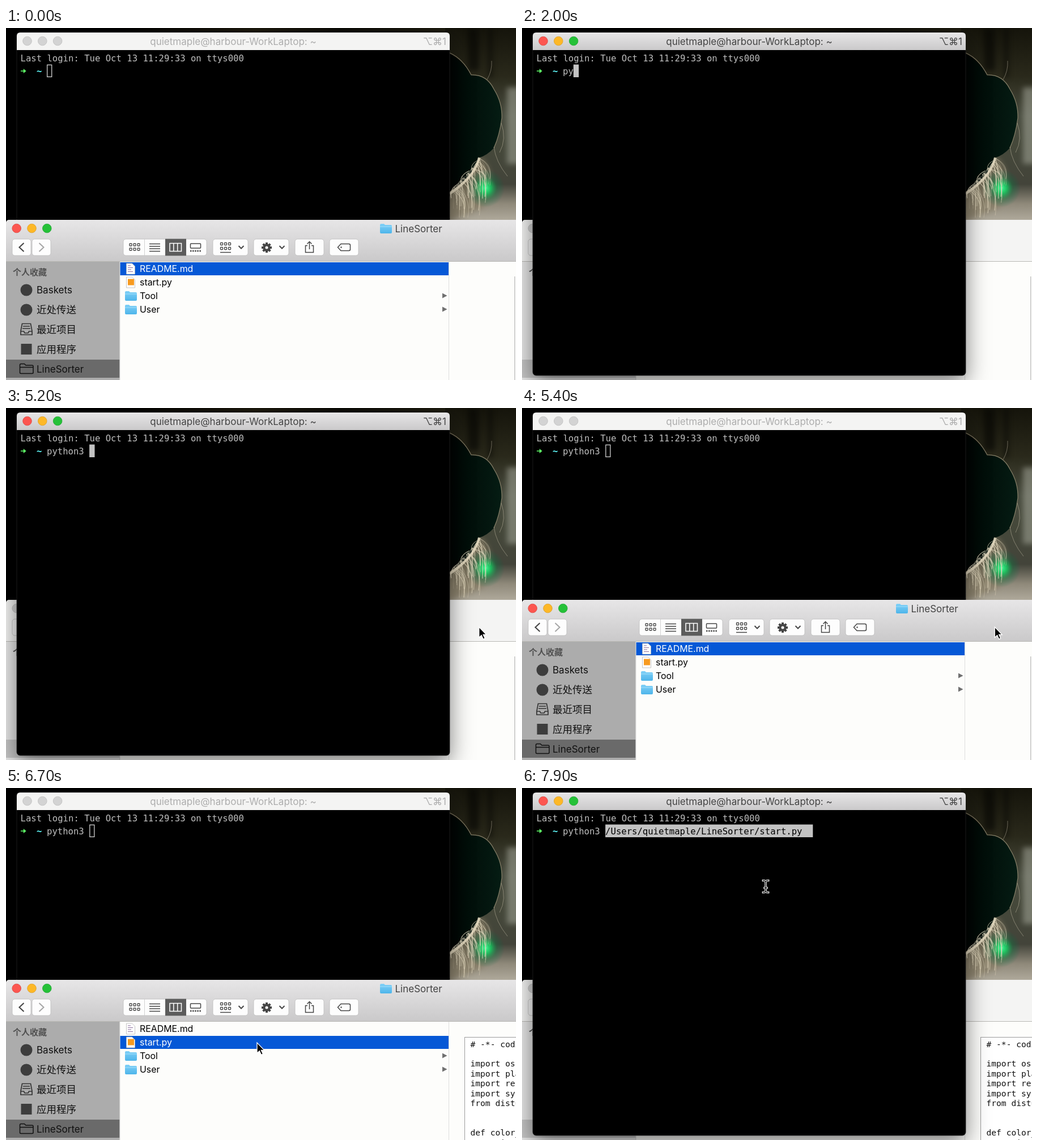
Animation of 900x622 px, one loop 8000 ms. Source, as an HTML page:

```html
<!DOCTYPE html>
<html lang="zh">
<head>
<meta charset="utf-8">
<title>Drag a script into the terminal</title>
<style>
  html, body { margin: 0; width: 100%; height: 100%; overflow: hidden; background: #000; }
  svg { display: block; width: 900px; height: 622px; }
  text { white-space: pre; dominant-baseline: alphabetic; }
  .ui { font: 17px Inter, "Noto Sans CJK SC", "Noto Sans CJK", "DejaVu Sans", sans-serif; }
  .row { font-size: 15.9px; }
  .heading { font-size: 15px; font-weight: 700; fill: #505050; }
  .mono { font: 15.6px "DejaVu Sans Mono", "Liberation Mono", monospace; fill: #bfbfbf; }
  .code { font-size: 14.6px; fill: #111; }
  .line { fill: none; stroke: #454545; stroke-width: 1.5; }
  .button { fill: #fdfdfd; stroke: #bcbcbc; stroke-width: .8; }

  .light { fill: #d3d3d3; stroke: #bdbdbd; stroke-width: .8; }
  .active .red { fill: #fc5650; stroke: #dd443e; }
  .active .yellow { fill: #fdb827; stroke: #dc9d24; }
  .active .green { fill: #25c138; stroke: #1ea630; }

  .bar { fill: #f4f4f3; }
  .active .bar { fill: url(#barFill); }
  .title { fill: #adadad; }
  .active .title { fill: #434343; }
  #terminal .shadow { filter: drop-shadow(0 14px 20px rgba(0, 0, 0, .5)); }

  .side { fill: #e8e8e8; }
  .active .side { fill: #acacac; }
  .place { fill: #c6c6c6; }
  .active .place { fill: #6a6a6a; }
  #finder:not(.active) .button { fill: #f5f5f5; }
  .file rect.pick { fill: none; }
  .file.chosen rect.pick { fill: #0558d6; }
  .file.chosen text { fill: #fff; }
  .soft { filter: blur(5px); }
</style>
</head>
<body>
<svg viewBox="0 0 900 622">
  <defs>
    <linearGradient id="barFill" x2="0" y2="1">
      <stop stop-color="#e7e6e7"/><stop offset="1" stop-color="#cac9ca"/>
    </linearGradient>
    <linearGradient id="room" x2="0" y2="1">
      <stop stop-color="#15140b"/><stop offset=".25" stop-color="#2a291b"/>
      <stop offset=".45" stop-color="#4a4d40"/><stop offset=".6" stop-color="#45483a"/>
      <stop offset=".8" stop-color="#43443a"/><stop offset=".9" stop-color="#8f897a"/>
      <stop offset="1" stop-color="#b5afa1"/>
    </linearGradient>
    <linearGradient id="topEdge">
      <stop stop-color="#000"/><stop offset=".4" stop-color="#1d190d"/>
      <stop offset=".65" stop-color="#0d0c07"/><stop offset="1" stop-color="#211f12"/>
    </linearGradient>
    <linearGradient id="hair">
      <stop stop-color="#000"/><stop offset=".4" stop-color="#010e09"/><stop offset="1" stop-color="#051c13"/>
    </linearGradient>
    <radialGradient id="glow">
      <stop stop-color="#3dff95"/><stop offset=".3" stop-color="#12c45c" stop-opacity=".85"/>
      <stop offset=".6" stop-color="#0c7440" stop-opacity=".4"/><stop offset="1" stop-color="#064" stop-opacity="0"/>
    </radialGradient>
    <linearGradient id="folderFill" x2="0" y2="1">
      <stop stop-color="#7fd0f7"/><stop offset="1" stop-color="#4eb5ea"/>
    </linearGradient>
    <path id="beamShape" d="M-4.500-10.500Q0-10.500 0-7.500V7.500Q0 10.500-4.500 10.500M4.500-10.500Q0-10.500 0-7.500M0 7.500Q0 10.500 4.500 10.500M-2 2.500H2"/>
  </defs>
  <g id="photo"></g>
  <g id="finder" class="ui"></g>
  <g id="terminal" class="ui"></g>
  <g id="arrow"><path d="M0 0V18.5L4.4 14.6 7.4 21.4 10.4 20.1 7.4 13.5H13Z"
    fill="#000" stroke="#fff" stroke-width="1.3"/></g>
  <g id="beam" fill="none" stroke-linecap="square">
    <use href="#beamShape" stroke="#fff" stroke-width="3.6"/>
    <use href="#beamShape" stroke="#000" stroke-width="1.3"/>
  </g>
</svg>
<script>
const LOOP = 8000, STEP = 100, CELL = 9.39;
const USER = "quietmaple", HOST = "harbour-WorkLaptop", FOLDER = "LineSorter";
const COMMAND = "python3 ", PATH = `/Users/${USER}/${FOLDER}/start.py`;
const $ = id => document.getElementById(id);

const rect = (x, y, w, h, attrs = "") => `<rect x="${x}" y="${y}" width="${w}" height="${h}" ${attrs}/>`;
const path = (d, attrs = 'class="line"') => `<path d="${d}" ${attrs}/>`;
const text = (x, y, s, attrs = "") => `<text x="${x}" y="${y}" ${attrs}>${s}</text>`;
const disc = (x, y, r, attrs) => `<circle cx="${x}" cy="${y}" r="${r}" ${attrs}/>`;
const lights = (x, y) => ["red", "yellow", "green"]
  .map((name, i) => disc(x + i * 26.8, y, 7.8, `class="light ${name}"`)).join("");

function seeded(seed) {
  return () => (seed = (seed * 16807) % 2147483647) / 2147483647;
}

function drawPhoto() {
  const random = seeded(77);
  const wisp = (d, width, opacity) =>
    path(d, `fill="none" stroke="#e2d8be" stroke-width="${width}" opacity="${opacity}"`);
  let strands = "";
  for (let i = 0; i < 60; i++) {
    const k = random(), x = 838 - 54 * k, y = 230 + 60 * k;
    const dx = random() * 42 - 16, dy = Math.min(20 + random() * 50, 335 - y);
    strands += wisp(`M${x} ${y}q${dx * 1.3} ${dy * .3} ${dx} ${dy}`, .6 + random() * .9, .3 + random() * .5);
  }
  return rect(200, 0, 600, 10, 'fill="url(#topEdge)"') +
    rect(775, 0, 125, 345, 'fill="url(#room)"') +
    rect(815, 0, 20, 75, 'fill="#070704" opacity=".6" class="soft"') +
    rect(850, 0, 9, 88, 'fill="#070704" opacity=".5" class="soft"') +
    rect(884, 105, 24, 135, 'fill="#9a9d90" opacity=".6" class="soft"') +
    path("M838 228Q862 250 856 300L840 318 775 345V280Z", 'fill="#857a61" opacity=".65" class="soft"') +
    path("M775 42Q806 54 821 83 848 82 861 108 876 132 875 159 871 190 861 212 848 226 835 229 828 262 775 294Z", 'fill="url(#hair)"') +
    path("M783 44Q806 54 821 83 848 82 861 108 876 132 875 159 871 190 861 212", 'fill="none" stroke="#a0957b" stroke-width="1.200" opacity=".8"') +
    wisp("M835 229Q828 262 783 293", 4, .9) +
    wisp("M849 91Q858 76 857 58M874 168Q884 196 871 220M861 210Q864 236 885 262", .8, .5) +
    disc(846, 283, 34, 'fill="url(#glow)"') + strands;
}

const folder = (x, y) =>
  path(`M${x} ${y + 2}q0-2 2-2h5l2 2h10q2 0 2 2v11q0 2-2 2H${x + 2}q-2 0-2-2Z`, 'fill="url(#folderFill)"') +
  path(`M${x} ${y + 5}h21`, 'stroke="#a5e0fb" stroke-width="1"');

const sheet = (y, mark) =>
  path(`M212.500 ${y - 9}h10l5 5v14h-15Z`, 'fill="#fff" stroke="#b8b8b8" stroke-width=".8"') + mark;

const grid = (x, y, cell, gap) => [0, 1, 2, 3, 4, 5].map(i =>
  rect(x + i % 3 * gap, y + (i > 2) * (gap + 1), cell, cell, 'class="line" rx=".8" style="stroke-width:1.300"')).join("");

function drawToolbar() {
  const buttons = [[11, 33], [46, 33], [207, 147], [365, 62], [437, 62], [510, 51], [571, 51]]
    .map(([x, w]) => rect(x, 373, w, 29, 'rx="4.500" class="button"')).join("");
  const chevrons = path("M410.500 385l4.500 4.500 4.500-4.500M482.500 385l4.500 4.500 4.500-4.500", 'class="line" style="stroke-width:2"');
  const teeth = [0, 45, 90, 135].map(a =>
    rect(458, 379, 4, 18, `fill="#454545" transform="rotate(${a} 460 388)"`)).join("");
  return buttons +
    path("M31.500 380l-8 7.500 8 7.500", 'class="line" style="stroke-width:2.100"') +
    path("M58.500 380l8 7.500-8 7.500", 'class="line" style="stroke:#a5a5a5;stroke-width:2"') +
    path("M244.500 373v29", 'stroke="#d0d0d0"') + rect(281, 372.600, 37, 29.800, 'fill="#5c5c5c"') +
    grid(218, 381, 4, 7) + path("M253 381.500h19m-19 4.300h19m-19 4.300h19m-19 4.300h19") +
    path("M289 380.500h20.500v14H289ZM295.800 381v13M302.700 381v13", 'class="line" style="stroke:#fff"') +
    rect(325.500, 381, 18, 8, 'class="line" rx="1"') + path("M325 394h19", 'class="line" stroke-dasharray="2.500 1.600" style="stroke-width:2.500"') +
    grid(378.500, 379.500, 4, 7) + path("M378 396.500h19") + chevrons +
    teeth + disc(460, 388, 6.700, 'fill="#454545"') + disc(460, 388, 2.500, 'fill="#fdfdfd"') +
    path("M532 384.500h-3.500v12h14v-12H539M535.500 391v-13.500m-4 4l4-4 4 4") +
    path("M591 381.500h14q2.500 0 2.500 2.500v7q0 2.500-2.500 2.500h-14l-5.500-6Z") + disc(591.500, 387.500, 1.200, 'fill="#454545"');
}

function drawFinder() {
  const places = [["Baskets", 463], ["近处传送", 498], ["最近项目", 533], ["应用程序", 567.500], [FOLDER, 602.500]];
  const labels = places.map(([name, y]) => text(54, y + 6, name, `fill="#111" ${/\w/.test(name) ? "" : 'style="font-size:17.500px"'}`)).join("");
  const inks = 'fill="none" stroke="#333" stroke-width="1.700"';
  const icons = [463, 498].map(y => disc(36, y, 10.500, 'fill="#3d3d3d"')).join("") +
    path("M28.500 522.500h15l2.500 13v6.500H26v-6.500ZM26 536h5.500l1.500 3h6l1.500-3H46M30 527h12m-13 4h14", inks) +
    rect(26.500, 558, 19, 19, 'fill="#3d3d3d"') +
    path("M24.500 595.500q0-2 2-2h6l2.500 2.500h11q2 0 2 2V609q0 1.500-2 1.500h-19.500q-2 0-2-1.500ZM24.500 599.500H48", 'fill="none" stroke="#111" stroke-width="1.500"');
  const docMark = path("M215 420h5m-5 3.500h9m-9 3.500h6m-6 3.500h9", 'stroke="#8a6d9c" stroke-width="1.200"');
  const files = [
    ["README.md", 425, sheet(425, docMark)],
    ["start.py", 449, sheet(449, rect(215, 443.500, 11, 11, 'fill="#f79a1f"'))],
    ["Tool", 473, folder(210, 465)],
    ["User", 497, folder(210, 489)]
  ].map(([name, y, icon], i) => `<g class="file" id="file${i}">` +
    rect(201.500, y - 11, 579.500, 23, 'class="pick"') + icon +
    text(236, y + 5.500, name, 'class="row"') +
    (i > 1 ? path(`M770 ${y - 4.500}l8.500 4.500-8.500 4.500Z`, 'fill="#707070"') : "") + "</g>").join("");
  const source = ["# -*- coding: utf-8 -*-", "", "import os", "import platform", "import re", "import sys",
    "from distutils import log", "", "", "def color_print(text):", "    print(text)"]
    .map((line, i) => text(819.500, 457.500 + i * 17.400, line, 'class="mono code"')).join("");
  return path("M0 622V345q0-6 6-6H900V622Z", 'fill="#fdfdfb"') +
    path("M0 412V345q0-6 6-6H900V412Z", 'class="bar"') +
    path("M0 412.500H900", 'stroke="#b9b8b4"') +
    rect(0, 413, 200.500, 209, 'class="side"') + rect(0, 586, 200.500, 32, 'class="place"') +
    path("M200.800 413V622", 'stroke="#c4c4c4" stroke-width=".8"') +
    path("M781.500 413V622", 'stroke="#dedede"') +
    lights(18.700, 354) + folder(660, 346) + text(686.500, 360.500, FOLDER, 'class="title"') +
    drawToolbar() + text(12, 437, "个人收藏", 'class="heading"') + labels + icons + files +
    `<g id="blankPreview">${path("M897.800 439V622", 'stroke="#a8a8a8"')}</g>` +
    `<g id="codePreview">${rect(809.500, 440.500, 120, 200, 'fill="#fff" stroke="#9c9c9c"')}${source}</g>`;
}

function drawTerminal() {
  return rect(19, 8, 764, 606, 'rx="6" fill="#000" stroke="#222" stroke-width=".8" class="shadow"') +
    path("M19 39V14q0-6 6-6H777q6 0 6 6V39Z", 'class="bar"') + lights(37.500, 23) +
    text(401, 29.500, `${USER}@${HOST}: ~`, 'class="title" text-anchor="middle"') +
    text(777, 29.500, "⌥⌘1", 'class="title" text-anchor="end"') +
    text(25.500, 59, "Last login: Tue Oct 13 11:29:33 on ttys000", 'class="mono"') +
    path("M26 76h7M31.500 73.500l3 2.500-3 2.500Z", 'fill="#5ffa68" stroke="#5ffa68" stroke-width="1.500"') +
    text(54, 82, "~", 'class="mono" style="fill:#5ffdff;font-weight:700"') +
    text(72, 82, "", 'id="typed" class="mono"') + rect(0, 64, CELL, 23, 'id="caret"') +
    text(72 + 8 * CELL, 82, PATH, 'id="pasted" class="mono" style="fill:#000"');
}

$("photo").innerHTML = drawPhoto();
$("finder").innerHTML = drawFinder();
$("terminal").innerHTML = drawTerminal();

const keyTimes = [1500, 1800, 2100, 2400, 2500, 2600, 2900, 3900];
const route = [[100, 340, 640], [500, 260, 170], [4400, 260, 170], [5000, 835, 387], [5600, 834, 387],
  [6400, 443, 450], [6800, 443, 450], [7500, 430, 174], [LOOP, 430, 174]];

function pointerAt(t) {
  const next = Math.max(1, route.findIndex(p => p[0] > t));
  const [t0, x0, y0] = route[next - 1], [t1, x1, y1] = route[next];
  const k = Math.min(1, Math.max(0, (t - t0) / (t1 - t0))), e = k * k * (3 - 2 * k);
  return [x0 + (x1 - x0) * e, y0 + (y1 - y0) * e];
}

const show = (id, on) => $(id).setAttribute("visibility", on ? "visible" : "hidden");

function render(t) {
  const between = (a, b) => t >= a && t < b;
  const terminalFront = between(700, 5300) || t >= 7700;
  const finderActive = t < 800 || between(5300, 7800);
  const pasted = t >= 7700, pickedScript = t >= 6400;
  const back = terminalFront ? $("finder") : $("terminal");
  if (back.previousElementSibling !== $("photo")) $("photo").after(back);

  $("terminal").classList.toggle("active", terminalFront);
  $("finder").classList.toggle("active", finderActive);
  $("file0").classList.toggle("chosen", !pickedScript);
  $("file1").classList.toggle("chosen", pickedScript);
  show("codePreview", t >= 6500);
  show("blankPreview", t < 6500);

  const count = keyTimes.filter(k => k <= t).length;
  const solid = between(800, 5300) || pasted;
  const caret = $("caret"), inset = solid ? 0 : .7;
  $("typed").textContent = COMMAND.slice(0, count);
  caret.setAttribute("x", 72 + count * CELL + inset);
  caret.setAttribute("y", 64.5 + inset);
  caret.setAttribute("height", 22.5 - 2 * inset);
  caret.setAttribute("width", CELL * (pasted ? PATH.length + 2 : 1) - 2 * inset);
  caret.setAttribute("fill", solid ? "#c3c3c3" : "none");
  caret.setAttribute("stroke", solid ? "none" : "#d0d0d0");
  caret.setAttribute("stroke-width", 1.3);
  show("pasted", pasted);

  const [x, y] = pointerAt(t);
  const visible = between(100, 1500) || t >= 4400;
  const dragging = between(6700, 7700);
  const overText = !dragging && x > 19 && x < 783 && (terminalFront || y < 339);
  for (const [id, on] of [["arrow", visible && !overText], ["beam", visible && overText]]) {
    show(id, on);
    $(id).setAttribute("transform", `translate(${x} ${y})`);
  }
}

function tick() {
  render(Math.floor(performance.now() % LOOP / STEP) * STEP);
  requestAnimationFrame(tick);
}
tick();
</script>
</body>
</html>
```
